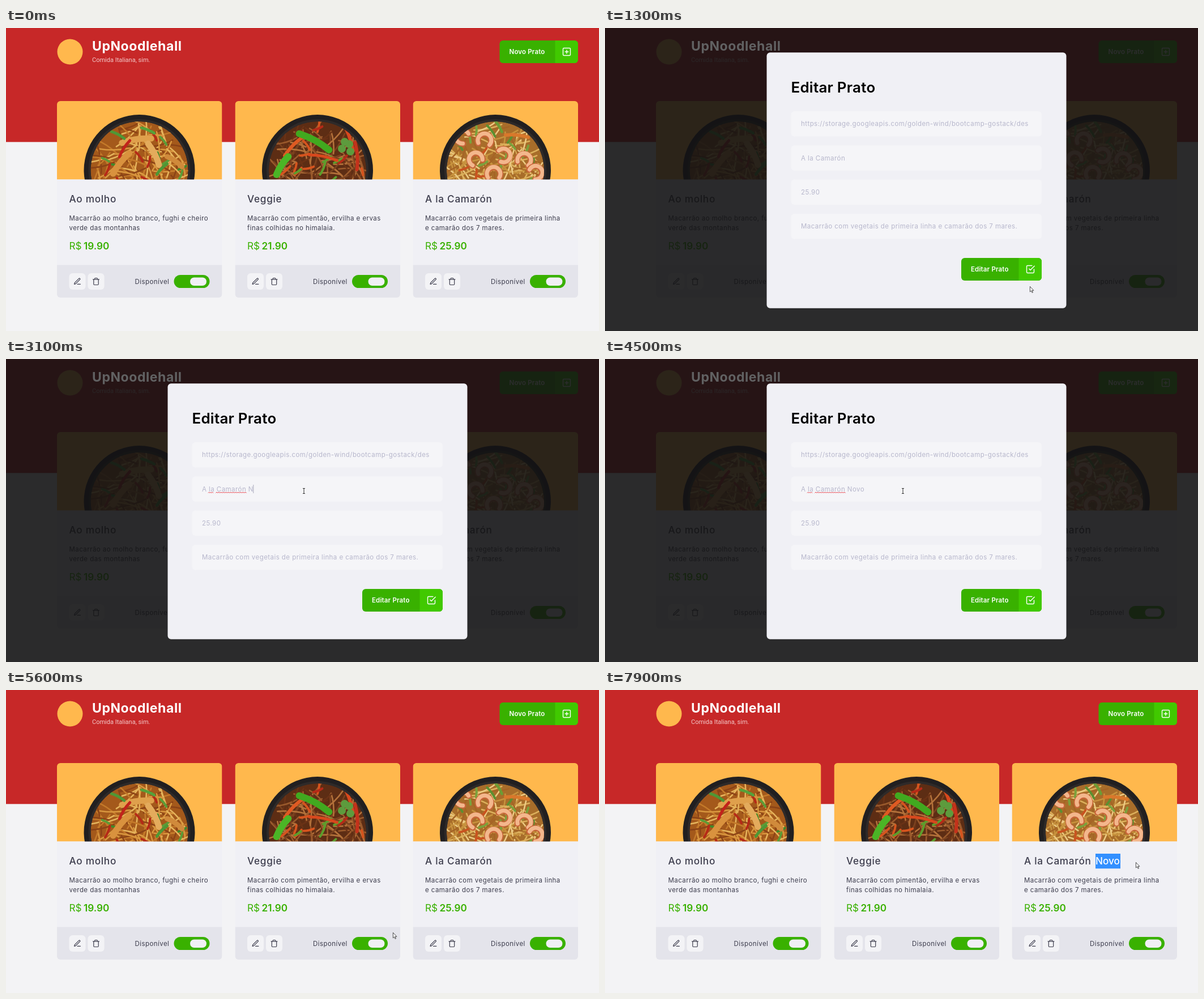
These frames come from a looping animation (1047x535 px, 8000 ms). An HTML page:

```html
<!DOCTYPE html>
<html lang="pt-BR">
<head>
<meta charset="utf-8">
<title>UpNoodlehall</title>
<style>
html, body { margin: 0; width: 100%; height: 100%; overflow: hidden; background: #f3f3f5; }
svg { display: block; width: 100vw; height: 100vh; }
text { font-family: Inter, "Open Sans", sans-serif; font-optical-sizing: none; fill: #3d3d4d; white-space: pre; }
.body { font-size: 11.5px; letter-spacing: .038em; }
.field { fill: #b7b7cc; }
.name { font-size: 17.2px; font-weight: 500; letter-spacing: .042em; }
.novo { letter-spacing: 0; }
.price { font-size: 17.2px; fill: #39b100; }
.strong { font-weight: 600; }
.btn { font-size: 11.5px; font-weight: 600; letter-spacing: .013em; fill: #fff; }
.brand { font-size: 23px; font-weight: 700; letter-spacing: .025em; fill: #fff; }
.slogan { font-family: Roboto, sans-serif; font-size: 11px; fill: #f3c9c9; }
.heading { font-size: 25.9px; font-weight: 600; letter-spacing: .01em; fill: #000; }
.icon { fill: none; stroke-width: 2; stroke-linecap: round; stroke-linejoin: round; }
</style>
</head>
<body>
<svg id="stage" viewBox="0 0 1047 535" preserveAspectRatio="none" xmlns="http://www.w3.org/2000/svg"></svg>
<script>
const LOOP = 8000;

const icons = {
  pen: 'M12 20h9M16.5 3.5a2.12 2.12 0 0 1 3 3L7 19l-4 1 1-4L16.5 3.5z',
  trash: 'M3 6h18M19 6v14a2 2 0 0 1-2 2H7a2 2 0 0 1-2-2V6m3 0V4a2 2 0 0 1 2-2h4a2 2 0 0 1 2 2v2',
  plus: 'M5 3h14a2 2 0 0 1 2 2v14a2 2 0 0 1-2 2H5a2 2 0 0 1-2-2V5a2 2 0 0 1 2-2zM12 8v8M8 12h8',
  check: 'M9 11l3 3L22 4M21 12v7a2 2 0 0 1-2 2H5a2 2 0 0 1-2-2V5a2 2 0 0 1 2-2h11'
};

const rect = (x, y, w, h, fill, r = 0, extra = '') =>
  `<rect x="${x}" y="${y}" width="${w}" height="${h}" rx="${r}" fill="${fill}" ${extra}/>`;
const text = (x, y, cls, str, extra = '') => `<text x="${x}" y="${y}" class="${cls}" ${extra}>${str}</text>`;
const icon = (name, cx, cy, scale, color) =>
  `<path class="icon" stroke="${color}" d="${icons[name]}" transform="translate(${cx} ${cy}) scale(${scale}) translate(-12 -12)"/>`;
const stroke = (d, color, width) =>
  `<path d="${d}" fill="none" stroke="${color}" stroke-width="${width}" stroke-linecap="round"/>`;

function random(seed) {
  return () => (seed = (seed * 16807) % 2147483647) / 2147483647;
}

const slice = (x, y, angle, length, width, color) => {
  const dx = Math.cos(angle) * length / 2, dy = Math.sin(angle) * length / 2;
  return stroke(`M${x - dx} ${y - dy}Q${x + dy * .2} ${y - dx * .2} ${x + dx} ${y + dy}`, color, width);
};
const shrimp = (x, y, angle) => `<g transform="translate(${x} ${y}) rotate(${angle})">` +
  stroke('M-11 8A12 12 0 1 1 9 8', '#c9653a', 10) + stroke('M-11 7A12 12 0 1 1 9 7', '#f3b78c', 7) + '</g>';

function scatter(rnd, count, length, width, colors) {
  let out = '';
  for (let i = 0; i < count; i++) {
    const a = rnd() * Math.PI * 2, d = Math.sqrt(rnd()) * 80;
    out += slice(Math.cos(a) * d, Math.sin(a) * d, rnd() * Math.PI, length * (.6 + rnd() * .6), width, colors[i % colors.length]);
  }
  return out;
}

const dishes = [
  {
    x: 90, name: 'Ao molho', price: '19.90', seed: 41,
    lines: ['Macarrão ao molho branco, fughi e cheiro', 'verde das montanhas'],
    base: '#a4591b', noodles: ['#d9973f', '#c47a2a', '#e5b45c', '#8b4316'],
    bits: ['#3f8a2b', '#b52a17', '#5c9c37'],
    top: () => slice(-5, -52, -.15, 52, 11, '#dfa04c') + slice(-32, -12, -.9, 46, 11, '#d9923e') +
      slice(25, -28, 1.1, 42, 11, '#e4ab5c') + slice(62, -15, .6, 32, 9, '#d08a3b') +
      slice(-26, -38, -1, 34, 5, '#c1231b') + slice(-38, -62, .5, 26, 5, '#4f9735') +
      slice(15, -70, .4, 24, 5, '#56a13a') + slice(40, -2, -.8, 26, 5, '#4f9735')
  },
  {
    x: 404.5, name: 'Veggie', price: '21.90', seed: 77,
    lines: ['Macarrão com pimentão, ervilha e ervas', 'finas colhidas no himalaia.'],
    base: '#5d2d14', noodles: ['#9a5a2c', '#7b421f', '#b3713a', '#6a3216'],
    bits: ['#d6541e', '#b52a17', '#5d9d2c'],
    top: () => slice(52, -62, 1.2, 60, 6, '#d8481d') + slice(68, -25, 1.5, 48, 6, '#c4321b') +
      slice(-42, -42, -.8, 46, 6, '#df5a22') + slice(10, -22, .2, 50, 5, '#d8481d') +
      slice(-6, -50, .5, 60, 12, '#41a91f') + slice(-62, -8, -1, 38, 12, '#4bb526') +
      [[43, -38], [56, -46], [58, -33], [48, -50]].map(([x, y]) => `<circle cx="${x}" cy="${y}" r="7" fill="#5d9b3d"/>`).join('')
  },
  {
    x: 718.5, name: 'A la Camarón', price: '25.90', seed: 123,
    lines: ['Macarrão com vegetais de primeira linha', 'e camarão dos 7 mares.'],
    base: '#a86d2a', noodles: ['#dcb05c', '#c7923d', '#ecca83', '#a56425'],
    bits: ['#5c8f31', '#c9531f', '#7ba13c'],
    top: () => slice(38, -60, .1, 40, 6, '#d9782b') + slice(5, -78, 1, 24, 5, '#6d9b35') +
      shrimp(-58, -60, -60) + shrimp(-18, -53, 10) + shrimp(-34, -20, -30) +
      shrimp(15, -25, 80) + shrimp(52, -18, 20) + shrimp(-2, 6, 0) + shrimp(72, 5, 60)
  }
];

function bowl(dish) {
  const rnd = random(dish.seed);
  return `<g transform="translate(145.5 251)"><circle r="98" fill="#211f20"/><circle r="90" fill="#2e2a29"/>
    <g clip-path="url(#food)"><circle r="86" fill="${dish.base}"/>` +
    scatter(rnd, 130, 46, 2.6, dish.noodles) + scatter(rnd, 24, 20, 4, dish.bits) + dish.top() + '</g></g>';
}

const card = dish => `<g transform="translate(${dish.x} 0)"><g clip-path="url(#card)">` +
  rect(0, 129, 291.5, 138.5, '#ffb84d') + bowl(dish) +
  rect(0, 267.5, 291.5, 151, '#f0f0f5') + rect(0, 418.5, 291.5, 58, '#e4e4eb') + '</g>' +
  text(21.5, 308, 'name', dish.name) +
  dish.lines.map((line, i) => text(21.5, 339.5 + i * 17.3, 'body', line)).join('') +
  text(21.5, 390.5, 'price', 'R$') + text(47, 390.5, 'price strong', dish.price) +
  rect(21.5, 433, 29, 29, '#f3f3f6', 6) + icon('pen', 36, 447.5, .6, '#3d3d4d') +
  rect(54.5, 433, 29, 29, '#f3f3f6', 6) + icon('trash', 69, 447.5, .6, '#3d3d4d') +
  text(198.3, 451.7, 'body', 'Disponível', 'text-anchor="end"') +
  rect(206.5, 436, 63, 23, '#39b100', 11.5) + rect(235, 440.5, 29, 14.5, '#f0f0f5', 7.2) + '</g>';

const button = (x, y, w, label, glyph) => rect(x, y, w, 40, '#39b100', 6) +
  `<path d="M${x + w - 40.5} ${y}h34.5a6 6 0 0 1 6 6v28a6 6 0 0 1-6 6h-34.5z" fill="#41c900"/>` +
  text(x + 17, y + 24.3, 'btn', label) + icon(glyph, x + w - 20, y + 20, .719, '#fff');

function squiggle(from, to) {
  let d = `M${from} 236.5`;
  for (let x = from + 1.5, up = 1; x <= to; x += 1.5, up = !up) d += `L${x} ${up ? 235 : 236.5}`;
  return `<path d="${d}" fill="none" stroke="#e5303a" stroke-width=".9"/>`;
}

const field = (i, content, id = '') => rect(328.5, 147 + i * 60.3, 442.5, 44.5, '#f5f5f8', 6) +
  text(346, 173.3 + i * 60.3, 'body field', content, id);

const modal = `<g id="modal">` + rect(0, 0, 1047, 535, '#121214', 0, 'opacity=".89"') +
  text(152, 40, 'brand', 'UpNoodlehall', 'opacity=".25"') +
  rect(285.5, 43.2, 529, 451.5, '#f0f0f5', 6) + text(328.5, 114, 'heading', 'Editar Prato') +
  field(0, 'https://storage.googleapis.com/golden-wind/bootcamp-gostack/des') +
  field(1, '', 'id="typed"') + field(2, '25.90') +
  field(3, 'Macarrão com vegetais de primeira linha e camarão dos 7 mares.') +
  button(629, 406, 142, 'Editar Prato', 'check') +
  `<g id="spelling">${squiggle(357, 367)}${squiggle(370.5, 425.5)}</g>` +
  rect(0, 222, 1, 15, '#a9a9bb', 0, 'id="caret"') + '</g>';

const cursors = `<g id="cursor">
  <path id="arrow" d="M.4 .4V9.9L2.6 7.9 4.1 11.4 5.5 10.8 4 7.4H6.9Z" fill="#fff" stroke="#222" stroke-width=".8"/>
  <path id="hand" d="M-1 1Q0-.2 1 1V5Q2 4.3 2.8 5.3 4 4.7 4.5 5.8 5.8 5.5 5.8 7V9.5L4.6 12.2V13.5H-1.2V12.2L-3.8 8.2Q-3.8 6.8-2.5 7.2L-1 8.8Z" fill="#fff" stroke="#222" stroke-width=".9"/>
  <path id="beam" d="M-2-4.5H2M0-4.5V4.5M-2 4.5H2" fill="none" stroke="#333" stroke-width="1"/></g>`;

const stage = document.getElementById('stage');
stage.innerHTML = `<defs><clipPath id="card">${rect(0, 129, 291.5, 347, '#000', 6)}</clipPath>
  <clipPath id="food"><circle r="86"/></clipPath>
  <clipPath id="picked">${rect(866, 289, 0, 26.5, '#000', 0, 'id="pick"')}</clipPath></defs>` +
  rect(0, 0, 1047, 535, '#f3f3f5') + rect(0, 0, 1047, 201.3, '#c72828') +
  '<circle cx="113" cy="42" r="22.5" fill="#ffb84d"/>' +
  text(152, 40, 'brand', 'UpNoodlehall') + text(152, 60, 'slogan', 'Comida Italiana, sim.') +
  button(871.5, 22, 138.5, 'Novo Prato', 'plus') + dishes.map(card).join('') +
  '<g id="added">' + text(866, 308, 'name novo', 'Novo') + '<g clip-path="url(#picked)">' +
  rect(866, 289, 44, 26.5, '#3390ff') + text(866, 308, 'name novo', 'Novo', 'style="fill:#fff"') + '</g></g>' +
  modal + cursors;

const el = id => document.getElementById(id);
const show = (id, on) => el(id).setAttribute('visibility', on ? 'inherit' : 'hidden');
const within = (t, from, to) => t >= from && t < to;
const ease = p => p < .5 ? 2 * p * p : 1 - 2 * (1 - p) ** 2;

// start, duration, end x, end y
const moves = [
  [200, 700, 750, 456], [1400, 600, 526, 233], [4600, 500, 683, 428],
  [6300, 500, 866, 308], [7200, 300, 912, 304], [7800, 100, 937, 304]
];
// time, typed addition, caret x
const typing = [[0, '', 425], [2800, ' ', 428], [3100, ' N', 436.3], [3700, ' No', 443.5], [4000, ' Novo', 457.5]];
const picks = [[0, 0], [7300, 12], [7400, 32], [7500, 44]];
const latest = (list, t) => list.filter(item => item[0] <= t).pop();

function cursorAt(t) {
  let x = 937, y = 211;
  for (const [start, duration, toX, toY] of moves) {
    const p = ease(Math.min(1, Math.max(0, (t - start) / duration)));
    x += (toX - x) * p;
    y += (toY - y) * p;
  }
  return [x, y];
}

function draw(time) {
  const t = Math.floor(time / 100) * 100; // the picture advances in tenths of a second
  show('modal', within(t, 1300, 5600));

  const [, addition, caretX] = latest(typing, t);
  el('typed').textContent = 'A la Camarón' + addition;
  el('caret').setAttribute('x', caretX);
  show('caret', within(t, 2300, 4500) || within(t, 5000, 5400));
  show('spelling', within(t, 2300, 5400));
  if (!within(t, 1300, 5600)) ['caret', 'spelling'].forEach(id => show(id, false));

  show('added', t >= 6000);
  el('pick').setAttribute('width', latest(picks, t)[1]);

  const hand = within(t, 800, 1300) || within(t, 5000, 5600);
  const beam = within(t, 2000, 4800) || within(t, 6800, 7500);
  show('cursor', t >= 200);
  show('hand', hand);
  show('beam', beam);
  show('arrow', !hand && !beam);
  el('cursor').setAttribute('transform', `translate(${cursorAt(t)})`);
}

const began = performance.now();
function tick() {
  draw((performance.now() - began) % LOOP);
  requestAnimationFrame(tick);
}
tick();
</script>
</body>
</html>
```
